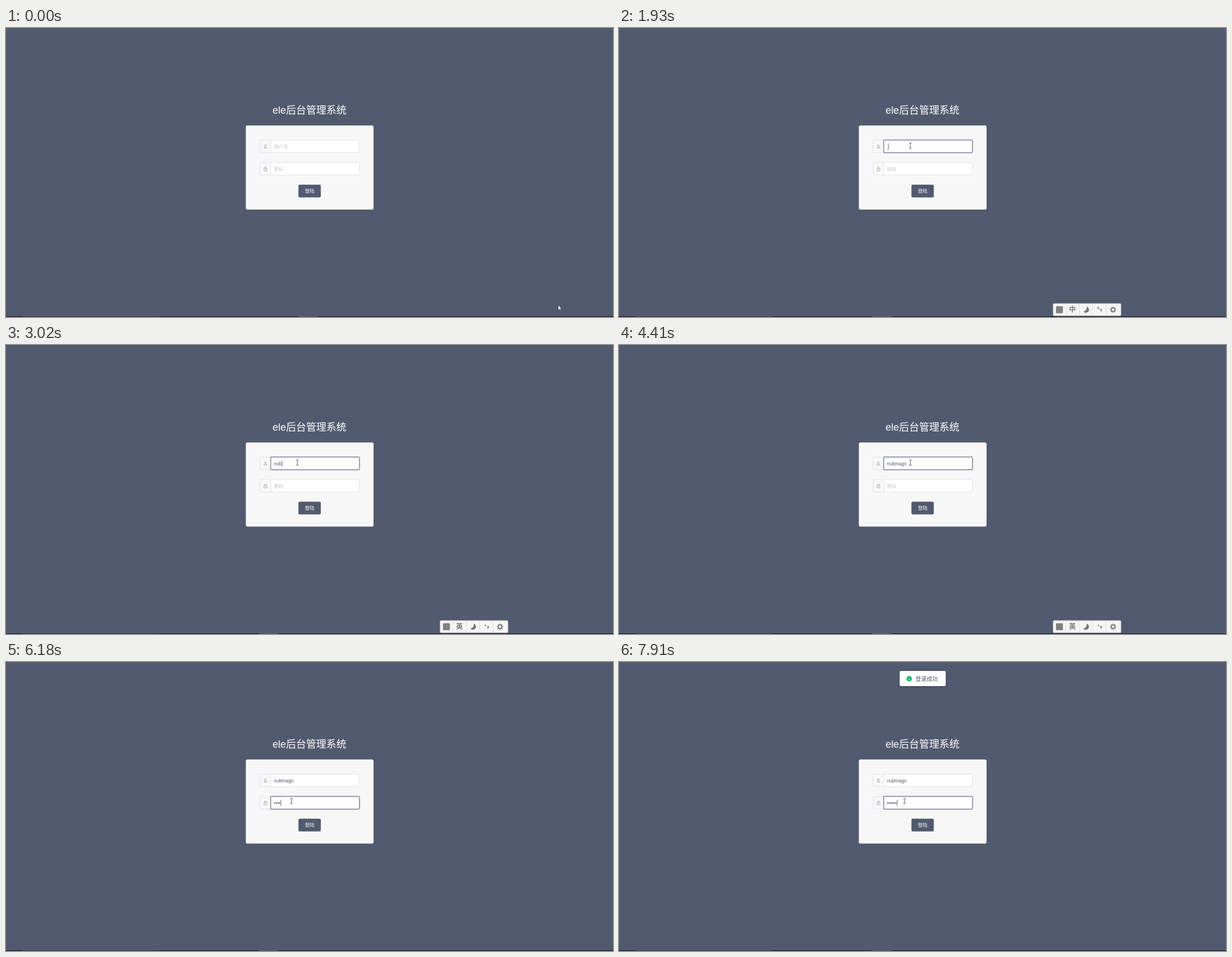
Write an HTML page that moves like this. It is 1085 by 516 pixels and loops after 7.99 s.

```html
<!DOCTYPE html>
<html lang="zh-CN">
<head>
<meta charset="utf-8">
<title>登陆</title>
<style>
  html, body { margin: 0; width: 100%; height: 100%; overflow: hidden; background: #515a6e; }
  svg { display: block; width: 1085px; height: 516px; }
  text { font: 8.5px "Liberation Sans", "Noto Sans CJK SC", sans-serif; fill: #515a6e; white-space: pre; }
  .title { font-size: 18px; fill: #fff; }
  .hint { fill: #c3c6cc; }
  .mid { text-anchor: middle; }

  .box { fill: #fff; stroke: #dcdee2; stroke-width: .8; }
  .addon { fill: #f8f8f9; stroke: #dcdee2; stroke-width: .8; }
  .icon { fill: none; stroke: #9297a2; stroke-width: .75; }
  .edge { fill: none; stroke: #747b8c; stroke-width: 1; }
  .glow { fill: none; stroke: #515a6e; stroke-opacity: .33; stroke-width: 1.3; }

  /* Everything shares one clock; hard cuts unless stated otherwise. */
  .a { animation: 7990ms step-end infinite; }
  .off { opacity: 0; }

  #edge1 { animation-name: edge1; }
  #glow1 { animation-name: glow1; }
  #edge2 { animation-name: edge2; }
  #glow2 { animation-name: glow2; }
  @keyframes edge1 { 9.7% { opacity: 1 } 63.07% { opacity: .45 } 64.07% { opacity: 0 } }
  @keyframes glow1 { 14.39% { opacity: 1 } 63.07% { opacity: .4 } 64.07% { opacity: 0 } }
  @keyframes edge2 { 61.07% { opacity: 1 } }
  @keyframes glow2 { 63.07% { opacity: .6 } 64.07% { opacity: 1 } }

  #hint1 { animation-name: hint1; }
  #hint2 { animation-name: hint2; }
  #name { animation-name: name; }
  #dots { animation-name: dots; }
  #under { animation-name: under; }
  @keyframes hint1 { 24.15% { opacity: 0 } }
  @keyframes hint2 { 68.08% { opacity: 0 } }
  @keyframes name { 37.79% { opacity: 1 } }
  @keyframes dots { 68.08% { opacity: 1 } }
  @keyframes under { 24.15% { opacity: 1 } 37.79% { opacity: 0 } }

  #type1 { animation-name: type1; }
  #type2 { animation-name: type2; }
  @keyframes type1 {
    24.15% { transform: translateX(2.4px) }
    37.79% { transform: translateX(14.2px) }
    41.67% { transform: translateX(21.3px) }
    44.55% { transform: translateX(26px) }
    46.43% { transform: translateX(30.7px) }
    48.31% { transform: translateX(35.5px) }
  }
  @keyframes type2 {
    68.08% { transform: translateX(3px) }
    69.58% { transform: translateX(6px) }
    73.46% { transform: translateX(9px) }
    77.34% { transform: translateX(11.9px) }
    81.35% { transform: translateX(14.9px) }
    84.23% { transform: translateX(17.9px) }
  }
  #caret1 { animation-name: caret1; }
  #caret2 { animation-name: caret2; }
  @keyframes caret1 {
    11.51% { opacity: 1 } 18.39% { opacity: 0 }
    24.15% { opacity: 1 } 31.03% { opacity: 0 }
    37.79% { opacity: 1 } 55.19% { opacity: 0 }
  }
  @keyframes caret2 { 62.07% { opacity: 1 } 91.11% { opacity: 0 } 97.99% { opacity: 1 } }

  #pop { animation-name: pop; }
  #pop1 { animation-name: pop1; }
  #pop2 { animation-name: pop2; }
  #pop3 { animation-name: pop3; }
  #pop text { font-size: 9px; fill: #444; }
  @keyframes pop { 25.4% { opacity: 1 } 37.79% { opacity: 0 } }
  @keyframes pop1 { 25.4% { opacity: 1 } 28.03% { opacity: 0 } }
  @keyframes pop2 { 28.03% { opacity: 1 } 31.03% { opacity: 0 } }
  @keyframes pop3 { 31.03% { opacity: 1 } 37.79% { opacity: 0 } }

  #ime { animation-name: ime; }
  #zh { animation-name: zh; }
  #en { animation-name: en; }
  #ime text { font-size: 12px; font-weight: bold; fill: #777; }
  @keyframes ime { 11.51% { opacity: 1 } 62.07% { opacity: 0 } }
  @keyframes zh { 37.79% { opacity: 0 } }
  @keyframes en { 37.79% { opacity: 1 } }

  #task { animation-name: task; }
  @keyframes task { 9.7% { transform: translateX(-71px) } }

  #mouse { transform: translate(987px, 494.5px); animation-name: mouse; }
  #arrow { animation-name: arrow; }
  #beam { animation-name: beam; }
  #press { animation-name: press; }
  @keyframes mouse {
    0%, .8% { transform: translate(987px, 494.5px); animation-timing-function: ease-in-out }
    10%, 57.8% { transform: translate(520.8px, 210px); animation-timing-function: ease-in-out }
    61.07%, 100% { transform: translate(510.2px, 248.3px) }
  }
  @keyframes arrow { 8.76% { opacity: 0 } 59.07% { opacity: 1 } 60.07% { opacity: 0 } }
  @keyframes beam { 8.76% { opacity: 1 } 59.07% { opacity: 0 } 60.07% { opacity: 1 } }
  @keyframes press {
    9.7% { opacity: 1 } 11.51% { opacity: 0 }
    61.07% { opacity: 1 } 63.07% { opacity: 0 }
  }

  #toast { animation-name: toast; filter: drop-shadow(0 1px 2px rgba(0, 0, 0, .2)); }
  #toast text { font-size: 10px; }
  @keyframes toast {
    0%, 96.4% { opacity: 0; transform: translateY(-40px); animation-timing-function: ease-in-out }
    98.95%, 100% { opacity: 1; transform: none }
  }
</style>
</head>
<body>
<svg viewBox="0 0 1085 516">
  <rect width="1085" height="516" fill="#515a6e"/>
  <g>
    <rect y="515" width="1085" height="1" fill="#0c0f18"/>
    <rect x="29" y="515" width="245" height="1" fill="#303643"/>
    <rect id="task" class="a" x="523" y="515" width="35" height="1" fill="#4d5564"/>
  </g>

  <text class="title mid" x="542.6" y="152.6">ele后台管理系统</text>
  <rect x="428.7" y="174" width="228.3" height="150.2" rx="3" fill="#f7f7f7"/>

  <!-- user name -->
  <rect class="addon" x="454.3" y="200.2" width="21" height="22.3" rx="2"/>
  <g class="icon">
    <circle cx="463.7" cy="210.3" r="1.6"/>
    <path d="M461.1 214.4q.3-1.9 1.7-2.4M466.3 214.4q-.3-1.9-1.7-2.4M460.9 214.4h5.6"/>
  </g>
  <path class="box" d="M473.4 200.2h156.3a2 2 0 0 1 2 2v18.3a2 2 0 0 1-2 2h-156.3z"/>
  <rect id="glow1" class="a off glow" x="472.7" y="199.3" width="159.7" height="24.1" rx="2.6"/>
  <path id="edge1" class="a off edge" d="M473.4 200.2h156.3a2 2 0 0 1 2 2v18.3a2 2 0 0 1-2 2h-156.3z"/>
  <text id="name" class="a off" x="478.7" y="214.6">nubmago</text>
  <g id="type1" class="a">
    <rect x="478.7" y="204" width="40" height="15" fill="#fff"/>
    <rect id="caret1" class="a off" x="478.8" y="206" width=".9" height="11" fill="#515a6e"/>
  </g>
  <rect id="under" class="a off" x="479" y="215.8" width="2.4" height=".8" fill="#515a6e"/>
  <text id="hint1" class="a hint" x="478.7" y="214.6">用户名</text>

  <!-- password -->
  <rect class="addon" x="454.3" y="240.2" width="21" height="22.3" rx="2"/>
  <g class="icon">
    <rect x="461" y="250.7" width="5.4" height="4.3" rx=".5"/>
    <path d="M462.1 250.7v-1a1.6 1.6 0 0 1 3.2 0v1M463.7 252.2v1.4"/>
  </g>
  <path class="box" d="M473.4 240.2h156.3a2 2 0 0 1 2 2v18.3a2 2 0 0 1-2 2h-156.3z"/>
  <rect id="glow2" class="a off glow" x="472.7" y="239.3" width="159.7" height="24.1" rx="2.6"/>
  <path id="edge2" class="a off edge" d="M473.4 240.2h156.3a2 2 0 0 1 2 2v18.3a2 2 0 0 1-2 2h-156.3z"/>
  <text id="dots" class="a off" x="478.7" y="254.6">••••••</text>
  <g id="type2" class="a">
    <rect x="478.7" y="244" width="22" height="15" fill="#fff"/>
    <rect id="caret2" class="a off" x="478.8" y="246" width=".9" height="11" fill="#515a6e"/>
  </g>
  <text id="hint2" class="a hint" x="478.7" y="254.6">密码</text>

  <rect x="522.7" y="279.8" width="40" height="22.6" rx="2.5" fill="#515a6e"/>
  <text class="mid" x="542.7" y="294.2" style="fill:#fff">登陆</text>

  <!-- input method candidates -->
  <g id="pop" class="a off">
    <rect x="482.5" y="220.5" width="178" height="40" fill="#fdfdfd" stroke="#c8c8c8"/>
    <g id="pop1" class="a off">
      <text x="491" y="234">n</text>
      <text x="491" y="253">1.你  2.年  3.那  4.能  5.呢</text>
    </g>
    <g id="pop2" class="a off">
      <text x="491" y="234">nu</text>
      <text x="491" y="253">1.女  2.怒  3.努  4.奴  5.弩</text>
    </g>
    <g id="pop3" class="a off">
      <rect x="482.5" y="220.5" width="218" height="40" fill="#fdfdfd" stroke="#c8c8c8"/>
      <text x="491" y="234">nu'b</text>
      <text x="491" y="253">1.女包  2.奴婢  3.女兵  4.女宾  5.女</text>
    </g>
  </g>

  <!-- input method bar -->
  <g id="ime" class="a off">
    <rect x="776" y="492" width="121.2" height="21.8" rx="1.5" fill="#f5f5f5" stroke="#c9c9c9" stroke-width=".8"/>
    <path d="M798.8 492.5v21M822.8 492.5v21M846.8 492.5v21M870.8 492.5v21" stroke="#d6d6d6" stroke-width=".8"/>
    <rect x="781" y="496.8" width="12.5" height="12.5" rx="1.5" fill="#808080"/>
    <g id="zh" class="a">
      <text class="mid" x="810.6" y="507.3">中</text>
      <circle cx="856.7" cy="500" r="1.5" fill="none" stroke="#777" stroke-width="1.1"/>
    </g>
    <g id="en" class="a off">
      <text class="mid" x="810.6" y="507.3">英</text>
      <circle cx="857" cy="500.8" r="1.3" fill="#777"/>
    </g>
    <path d="M836 497.5a5.6 5.6 0 1 1-6 8.7a7 7 0 0 0 6-8.7z" fill="#777"/>
    <path d="M860 503.2a1.6 1.6 0 1 1 3 .9q-.4 2-2.2 3l-.5-.6q1-.8 1-1.8q-1.2-.2-1.3-1.5z" fill="#777"/>
    <g fill="none" stroke="#777">
      <circle cx="883.2" cy="503" r="3.2" stroke-width="1.7"/>
      <circle cx="883.2" cy="503" r="4.7" stroke-width="1.6" pathLength="16" stroke-dasharray="1 1" stroke-dashoffset=".5"/>
    </g>
  </g>

  <g id="toast" class="a off">
    <rect x="501.7" y="16" width="82.3" height="27" rx="2.3" fill="#fff"/>
    <circle cx="518.7" cy="29.9" r="4.9" fill="#19be6b"/>
    <path d="M516.6 30l1.5 1.5l2.7-2.9" fill="none" stroke="#fff" stroke-width=".8"/>
    <text x="530" y="33.5">登录成功</text>
  </g>

  <g id="mouse" class="a">
    <circle id="press" class="a off" cx="-1" cy="-.3" r="8.6" fill="#fff500" fill-opacity=".66"/>
    <path id="arrow" class="a" d="M0 0v9l2-1.8l1.4 3.1l1.5-.7l-1.3-3h2.8z" fill="#fff" stroke="#1c202a" stroke-width=".6"/>
    <path id="beam" class="a off" d="M-2-4.6h1.5l.5.4l.5-.4h1.5M0-4.3v8.7M-2 4.7h1.5l.5-.4l.5.4h1.5" fill="none" stroke="#3a3a3a" stroke-width=".9"/>
  </g>
</svg>
</body>
</html>
```
